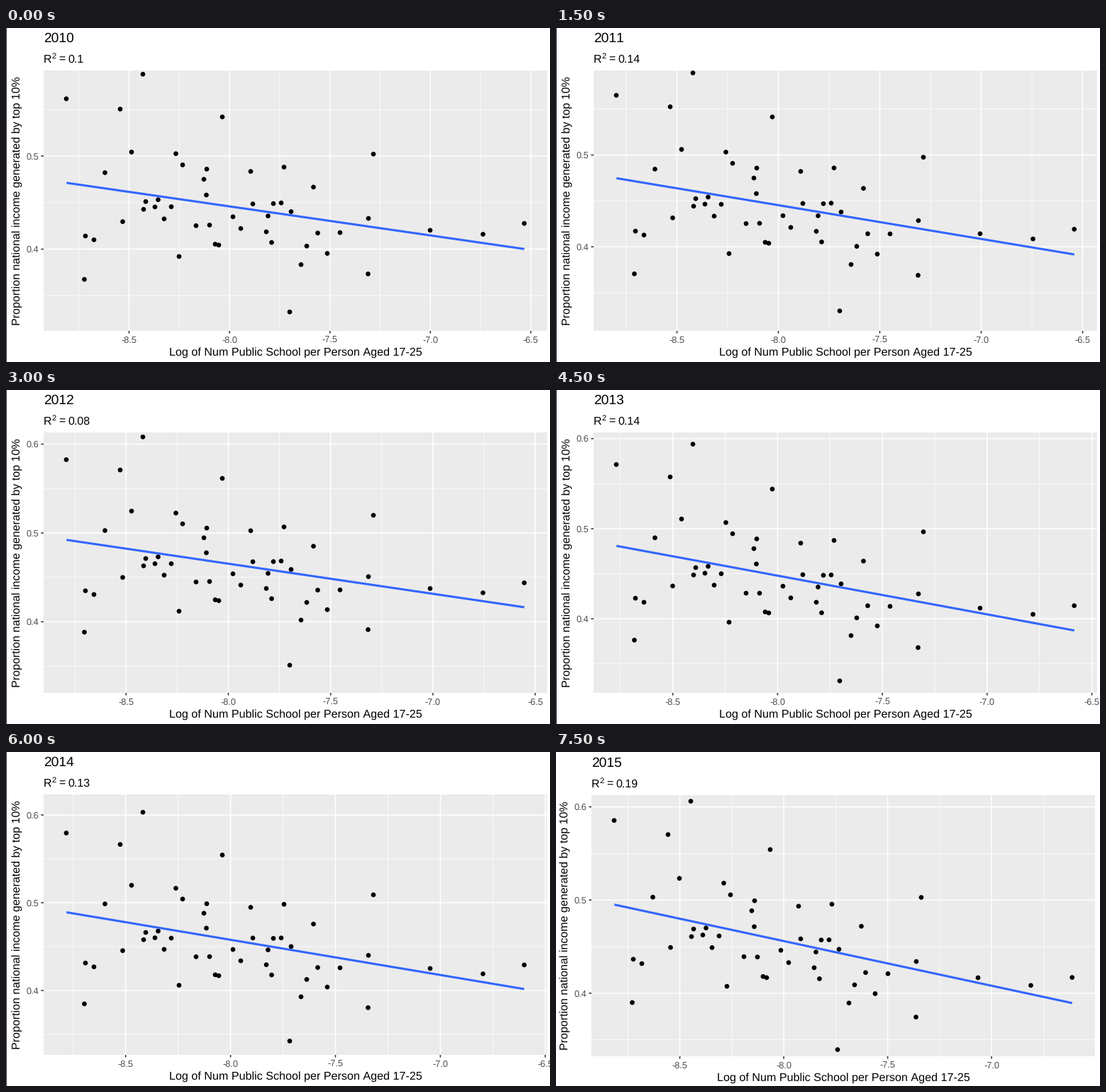
Recreate the animation shown at these times as a matplotlib script. Size 767 by 472 pixels, loop 8000 ms.

```python
import numpy as np
import matplotlib.pyplot as plt
from matplotlib.animation import FuncAnimation
from matplotlib.patches import Circle, Rectangle

W, H, DPI = 767, 472, 64
PT = 72 / DPI   # points per pixel
HOLD = 3        # ticks of 500 ms per year
REF_STEP = 127.3
WIDTH, INSET = 710, 710 / 22   # panel width, 5 % axis expansion

plt.rcParams.update({
    "font.family": "Liberation Sans",
    "text.kerning_factor": 6,
    "text.hinting": "none",
    "axes.unicode_minus": False,
    "toolbar": "None",
})

# Per year: R squared, x of -8.5, pixels per 0.5, y of 0.5, pixels per 0.1, trend ends
YEARS = [
    ("0.1", 173.5, 141.6, 181.0, 131.5, 218.8, 312.3),
    ("0.14", 170.5, 143.0, 179.5, 129.7, 212.3, 320.0),
    ("0.08", 169.3, 144.2, 202.0, 125.5, 211.8, 307.0),
    ("0.14", 164.7, 147.7, 196.0, 127.3, 220.3, 339.8),
    ("0.13", 168.7, 147.9, 213.0, 124.0, 226.5, 335.0),
    ("0.19", 174.6, 146.5, 209.2, 131.7, 215.7, 354.8),
]

# Each dot: distance from the panel's left edge, height below the trend line
DOTS = np.reshape([
    32, -115, 57.5, 128.5, 59, 69, 71, 72.5, 86.5, -21.5, 108, -111.5, 111.5, 42,
    124, -55, 140, -163.7, 141, 21, 144, 10, 157, 15.5, 161.5, 5, 170, 30,
    180, 12, 186.5, -61.5, 191, 78.5, 196, -47.5, 215, 33, 226, -32, 229.5, -11,
    230, -46.5, 234, 29.5, 242, 54.5, 247, 55, 252, -121, 267, 13.5, 278, 28,
    292, -52, 295, -8, 314, 27.5, 316.5, 5.5, 321.5, 41, 324, -12.5, 335, -15,
    339, -64.5, 347, 132.5, 349, -5, 363, 65.5, 371, 39, 380.5, -43, 386.5, 19,
    400, 45, 418, 14, 457.5, 65, 458, -11, 465, -100, 545, -7, 619.5, -12,
    677.7, -35], (-1, 2))

fig = plt.figure(figsize=(W / DPI, H / DPI), dpi=DPI, facecolor="white")
ax = fig.add_axes([0, 0, 1, 1])


def rect(x, y, w, h, color):
    ax.add_patch(Rectangle((x, y), w, h, fc=color, ec="none", lw=0))


def line(xs, ys, width, color, z=2):
    ax.plot(xs, ys, color=color, lw=width * PT, zorder=z,
            solid_capstyle="butt", snap=False)


def text(x, y, s, size, color="black", ha="left", **kw):
    ax.text(x, y, s, fontsize=size * PT, color=color, ha=ha, va="baseline", **kw)


def grid(box, x0, dx, y0, dy):
    left, top, right, bottom = box
    for k in range(-4, 10):  # half steps: even is major, odd is minor
        major = k % 2 == 0
        width, z = (1.55, 3) if major else (0.78, 2)
        x, y = x0 + k * dx / 2, y0 - k * dy / 2
        if left < x < right:
            line([x, x], [top, bottom], width, "white", z)
            if major:
                line([x, x], [bottom, bottom + 3.6], width, "#333333")
                text(x, bottom + 17, f"{-8.5 + k / 4:.1f}", 12.8, "#4D4D4D", "center")
        if top < y < bottom:
            line([left, right], [y, y], width, "white", z)
            if major:
                line([left - 3.6, left], [y, y], width, "#333333")
                text(left - 6.4, y + 4.6, f"{0.5 + k / 20:.1f}", 12.8, "#4D4D4D", "right")


def labels(box, year, r2):
    left, top, right, bottom = box
    text(left, top - 40, str(year), 19.2)
    for dx, dy, s, size in [(0, 0, "R", 16), (11.8, -6, "2", 11.2),
                            (21.5, 0, "=", 16), (34.2, 0, r2, 16)]:
        text(left + dx, top - 11 + dy, s, size)
    text((left + right) / 2, bottom + 35,
         "Log of Num Public School per Person Aged 17-25", 16.1, ha="center")
    text(left - 33, (top + bottom) / 2,
         "Proportion national income generated by top 10%", 16, ha="center",
         rotation=90, rotation_mode="anchor")


def draw(i):
    n = i // HOLD
    r2, x0, dx, y0, dy, start, end = YEARS[n]
    last = n == len(YEARS) - 1
    box = left, top, right, bottom = (50, 61, 760, 430) if last else (53, 60, 763, 428)
    ax.clear()
    ax.set(xlim=(0, W), ylim=(H, 0))
    ax.axis("off")

    if not last:
        rect(0, 0, 1, H, "#333333")
    rect(left, top, WIDTH, bottom - top, "#EBEBEB")
    grid(box, x0, dx, y0, dy)

    # dots ride on the trend line and stretch with the vertical scale
    ends = [INSET, WIDTH - INSET]
    for x, off in DOTS:
        y = np.interp(x, ends, [start, end]) + off * dy / REF_STEP
        ax.add_patch(Circle((left + x, y), 3.35, fc="black", lw=0, zorder=4))
    line([left + e for e in ends], [start, end], 3.1, "#3366FF", 5)
    labels(box, 2010 + n, r2)
    return []


anim = FuncAnimation(fig, draw, frames=16, interval=500, init_func=lambda: draw(0),
                     repeat=True, repeat_delay=0, blit=False)
plt.show()
```
